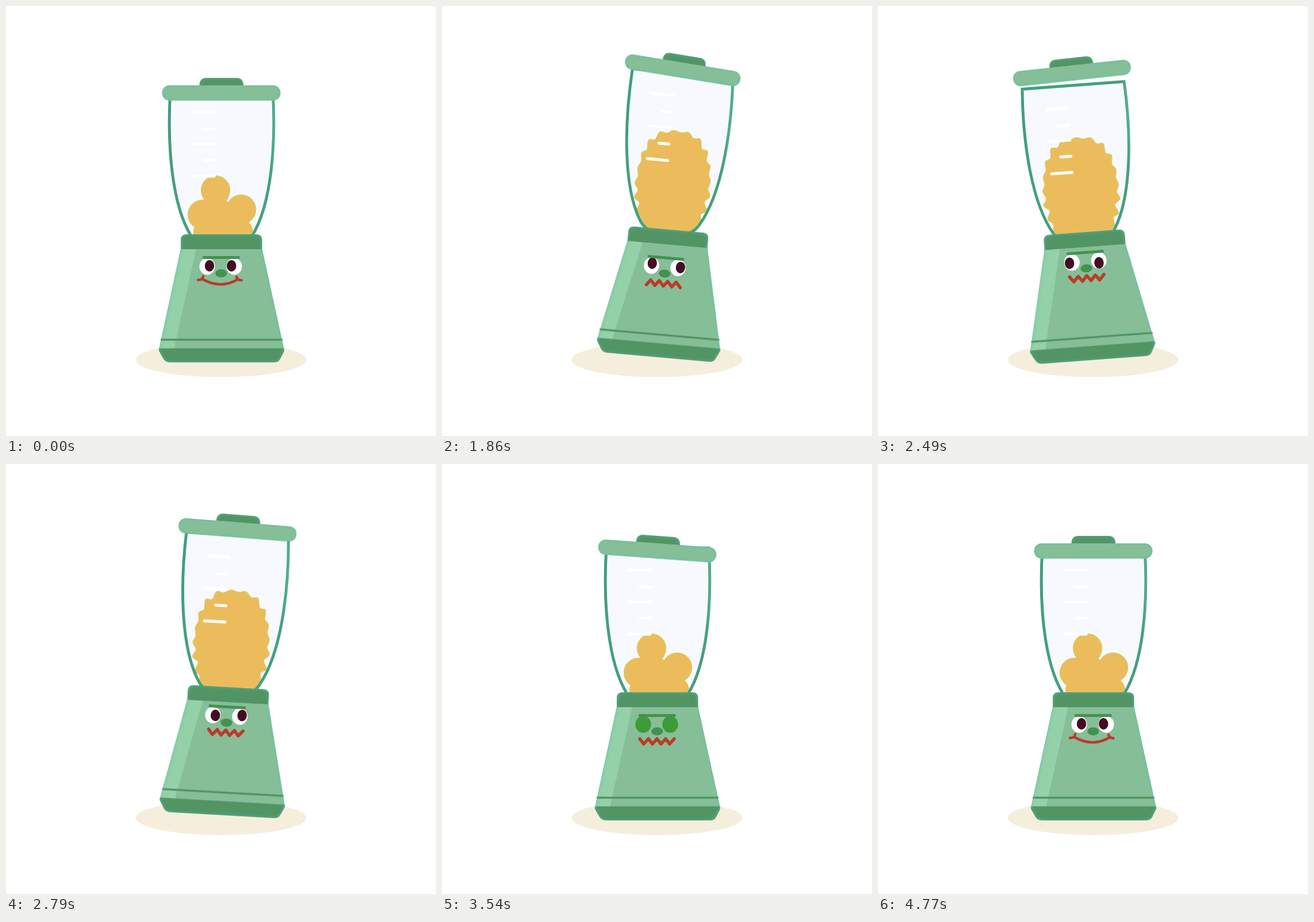
These frames come from a looping animation (748x748 px, 4890 ms). An HTML page:

```html
<!DOCTYPE html>
<html lang="en">
<head>
<meta charset="utf-8">
<title>Shaking blender</title>
<style>
html, body { margin: 0; width: 100%; height: 100%; overflow: hidden; background: #fff; }
svg { display: block; width: 100%; height: 100%; }
</style>
</head>
<body>
<svg viewBox="0 0 748 748">
  <defs>
    <filter id="tealRim" color-interpolation-filters="sRGB">
      <feGaussianBlur in="SourceAlpha" stdDeviation="3.2" result="soft"/>
      <feFlood flood-color="#56c2ac" flood-opacity=".8"/>
      <feComposite in2="soft" operator="out"/>
      <feComposite in2="SourceAlpha" operator="in" result="rim"/>
      <feMerge><feMergeNode in="SourceGraphic"/><feMergeNode in="rim"/></feMerge>
    </filter>
    <filter id="goldRim" color-interpolation-filters="sRGB">
      <feGaussianBlur in="SourceAlpha" stdDeviation="4.5" result="soft"/>
      <feFlood flood-color="#d8c858"/>
      <feComposite in2="soft" operator="out"/>
      <feComposite in2="SourceAlpha" operator="in" result="rim"/>
      <feMerge><feMergeNode in="SourceGraphic"/><feMergeNode in="rim"/></feMerge>
    </filter>
    <linearGradient id="glass" gradientUnits="userSpaceOnUse" x1="282" x2="468" y1="0" y2="0">
      <stop offset="0" stop-color="#3f9c7c"/><stop offset=".04" stop-color="#45a07e"/>
      <stop offset=".96" stop-color="#45a07e"/><stop offset="1" stop-color="#55b592"/>
    </linearGradient>
    <path id="jar" d="M286 146C280 240 288 345 322 400Q332 417 352 419H398Q418 417 428 400C462 345 470 240 464 146Z"/>
    <clipPath id="inJar"><use href="#jar"/></clipPath>
  </defs>

  <ellipse cx="374" cy="615.5" rx="148.5" ry="30" fill="#f6eedd"/>
  <g id="blender">
    <g id="jarGroup">
      <use href="#jar" fill="#f8f9ff"/>
      <g clip-path="url(#inJar)"><path id="juice" fill="#ecbc5c" filter="url(#goldRim)"/></g>
      <use href="#jar" fill="none" stroke="url(#glass)" stroke-width="5"/>
      <path d="M326 184.5H362M344 214H362M326 240H362M344 268H362M326 296H362" stroke="#fff" stroke-width="5" stroke-linecap="round"/>
    </g>
    <g filter="url(#tealRim)">
      <path d="M304.500 420H445L484 598H266Z" fill="#86bf97"/>
      <path d="M304.500 420H331.500L292 598H266Z" fill="#94d0a8"/>
      <path d="M269 580.500H481" stroke="#529464" stroke-width="3.500"/>
      <path d="M266 595.500H484L484 600L477 614Q474 620 466 620H286Q278 620 274 614L266 600Z" fill="#529464"/>
      <path d="M304 423V407Q304 397 314 397H435.500Q445.500 397 445.500 407V423Z" fill="#529464"/>
    </g>
    <g id="lid" filter="url(#tealRim)">
      <path d="M336.500 142V137Q337 125 349 125H400.500Q412.500 125 413 137V142Z" fill="#529464"/>
      <rect x="271.500" y="138" width="206" height="26.500" rx="13" fill="#86bf97"/>
    </g>
    <g id="face">
      <g fill="#fff"><ellipse cx="350" cy="453" rx="13.500" ry="14.500"/><ellipse cx="397" cy="453" rx="13.500" ry="14.500"/></g>
      <g fill="#430c22"><ellipse id="pupilL" rx="8.200" ry="10"/><ellipse id="pupilR" rx="8.200" ry="10"/></g>
      <g id="eyelids" fill="#3c9b38"><ellipse cx="350" cy="453" rx="13.800" ry="14.800"/><ellipse cx="397" cy="453" rx="13.800" ry="14.800"/></g>
      <rect x="342" y="435" width="64.500" height="5" rx="1.200" fill="#449150"/>
      <ellipse cx="374.300" cy="465" rx="10.200" ry="7" fill="#449150"/>
      <g fill="none" stroke="#bb3a2a" stroke-linecap="round" stroke-linejoin="round">
        <path id="smile" stroke-width="4.500" d="M334 476.500Q342 477 343 470M341.500 475Q374 493.500 404 475M401 471Q402 477 409.500 477"/>
        <path id="zigzag" stroke-width="5.500" d="M344 478L351 487L359 478L366 487L374 478L381 487L389 478L396 487L404 478"/>
      </g>
    </g>
  </g>
</svg>
<script>
const LOOP = 4890, STEP = 30, SHAKE = 1500, REST = 3540, SMILE = 4200, DONE = 4770;
const RAD = Math.PI / 180;
const el = {};
for (const id of ["blender", "jarGroup", "juice", "lid", "face", "pupilL", "pupilR", "eyelids", "smile", "zigzag"])
  el[id] = document.getElementById(id);

const clamp = (v, lo, hi) => Math.min(hi, Math.max(lo, v));
const smooth = u => u * u * (3 - 2 * u);
const linear = u => u;
const set = (node, value) => node.setAttribute("transform", value);

// keys: time, value, time, value, ...
function track(t, keys, ease = smooth) {
  if (t <= keys[0]) return keys[1];
  for (let i = 2; i < keys.length; i += 2)
    if (t < keys[i]) {
      const u = (t - keys[i - 2]) / (keys[i] - keys[i - 2]);
      return keys[i - 1] + (keys[i + 1] - keys[i - 1]) * ease(u);
    }
  return keys[keys.length - 1];
}

// Juice outlines: settled lumps and a foamy column, sampled at equal angles
const N = 300, HUB = [375, 355];
const LUMPS = [[375, 355, 18], [364.5, 320.5, 25.5], [409, 354, 26], [342, 363, 26],
  [345, 393, 19], [410, 392, 19.5], [377, 385, 32]];

const settled = Array.from({ length: N }, (_, i) => {
  const a = i / N * 2 * Math.PI, c = Math.cos(a), s = Math.sin(a);
  let r = 0;
  for (const [x, y, rad] of LUMPS) {
    const dx = x - HUB[0], dy = y - HUB[1];
    const along = dx * c + dy * s, cross = dx * s - dy * c;
    if (Math.abs(cross) < rad) r = Math.max(r, along + Math.sqrt(rad * rad - cross * cross));
  }
  return [HUB[0] + r * c, HUB[1] + r * s];
});

const column = Array.from({ length: N }, (_, i) => {
  const a = i / N * 2 * Math.PI, c = Math.cos(a), s = Math.sin(a);
  const r = (Math.abs(c / 65) ** 2.5 + Math.abs(s / 101) ** 2.5) ** (-1 / 2.5);
  return [r * c * (1 - 0.16 * Math.max(0, s)), r * s];
});
const arc = [0];
for (let i = 1; i <= N; i++) {
  const p = column[i - 1], q = column[i % N];
  arc.push(arc[i - 1] + Math.hypot(q[0] - p[0], q[1] - p[1]));
}

function juicePath(mix, wobble) {
  const pts = settled.map(([x, y], i) => {
    const [u, v] = column[i], along = arc[i] / arc[N] * 2 * Math.PI;
    const bump = (2.8 + 1.4 * Math.sin(along * 5)) * Math.sin(along * 22 + wobble);
    const k = 1 + bump / Math.hypot(u, v);
    return (x + (375 + u * k - x) * mix).toFixed(1) + " " + (y + (336 + v * k - y) * mix).toFixed(1);
  });
  return "M" + pts.join("L") + "Z";
}

function pupil(node, eyeX, restX, angle, t) {
  const spin = track(t, [SHAKE, 0, 1620, 1, 3450, 1, REST, 0]);
  const late = t >= REST ? track(t, [SMILE, 1, DONE, 0]) : 0;
  const x = restX * (1 - late), y = -1 - 2.5 * late;
  const ox = 4.4 * Math.cos(angle * RAD), oy = 4.2 * Math.sin(angle * RAD);
  set(node, `translate(${eyeX + x + (ox - x) * spin} ${453 + y + (oy - y) * spin})`);
}

function draw(t) {
  const phase = track(t, [1508, -360, 1860, 139.5, 2490, 1047, 3060, 1840.5, REST, 2520], linear) * RAD;
  const sin = Math.sin(phase), cos = Math.cos(phase);
  const power = track(t, [SHAKE, 0, 1830, 1, 3450, 1, REST, 0]);

  const squash = t > 1350 && t < 1508 ? 0.05 * Math.sin(Math.PI * (t - 1350) / 158) ** 2 : 0;
  const bob = -power * (8 * Math.abs(cos) + 4.5 * sin);
  const width = 1 + squash - 0.008 * power * (1 - cos);
  set(el.blender, `translate(375 ${620 + bob}) rotate(${7.8 * power * sin}) scale(${width} ${1 - squash}) translate(-375 -620)`);

  const lift = power * (11 + 8 * sin - 2.9 * cos);
  set(el.jarGroup, `translate(0 ${300 - lift}) scale(1 ${1 + lift * 0.0013}) translate(0 -300)`);

  const foam = track(t, [SHAKE, 0, 1700, 1, 3390, 1, REST, 0]);
  el.juice.setAttribute("d", juicePath(foam, sin));
  set(el.juice, `translate(0 ${0.55 * lift * foam})`);

  let hop = power * (32.4 - 3.5 * sin - 2.9 * cos + 30 * Math.max(0, 1 - Math.abs(cos) / 0.76));
  let tilt = power * (1 + 3.4 * sin - 1.3 * cos);
  if (t >= REST && t < 4050) {
    const age = t - REST, fade = (1 - age / 510) ** 2;
    tilt = 4.2 * Math.cos(age / 260 * 2 * Math.PI) * fade;
    hop = 7 * Math.max(0, Math.sin(Math.PI * age / 200)) * fade;
  }
  set(el.lid, `translate(0 ${-hop}) rotate(${tilt} 375 151)`);

  set(el.face, `translate(0 ${power * (2.4 - 0.6 * sin - 9.2 * cos)})`);
  pupil(el.pupilL, 350, 4, track(t, [SHAKE, -346, 1860, -76, 2490, 526, 3060, 910, REST, 1270], linear), t);
  pupil(el.pupilR, 397, -4.7, track(t, [SHAKE, -374, 1860, -14, 2490, 450, 3060, 910, REST, 1270], linear), t);

  const shut = track(t, [3450, 0, REST, 1, 4080, 1, SMILE, 0]);
  set(el.eyelids, `translate(0 438) scale(1 ${shut}) translate(0 -438)`);
  el.eyelids.style.display = shut > 0 ? "" : "none";

  const gritted = t >= SHAKE && t < SMILE;
  el.zigzag.style.display = gritted ? "" : "none";
  el.smile.style.display = gritted ? "none" : "";
  set(el.zigzag, `translate(0 482.5) scale(1 ${clamp(cos * 4, -1, 1)}) translate(0 -482.5)`);
  const grin = t < SMILE ? 1 : track(t, [SMILE, 0.4, 4440, 1.3, 4590, 1.28, DONE, 1]);
  set(el.smile, `translate(372 0) scale(${grin} 1) translate(-372 0)`);
}

let start = null, last = -1;
function tick(now) {
  if (start === null) start = now;
  const t = Math.floor((now - start) % LOOP / STEP) * STEP;
  if (t !== last) draw(last = t);
  requestAnimationFrame(tick);
}
draw(0);
requestAnimationFrame(tick);
</script>
</body>
</html>
```
